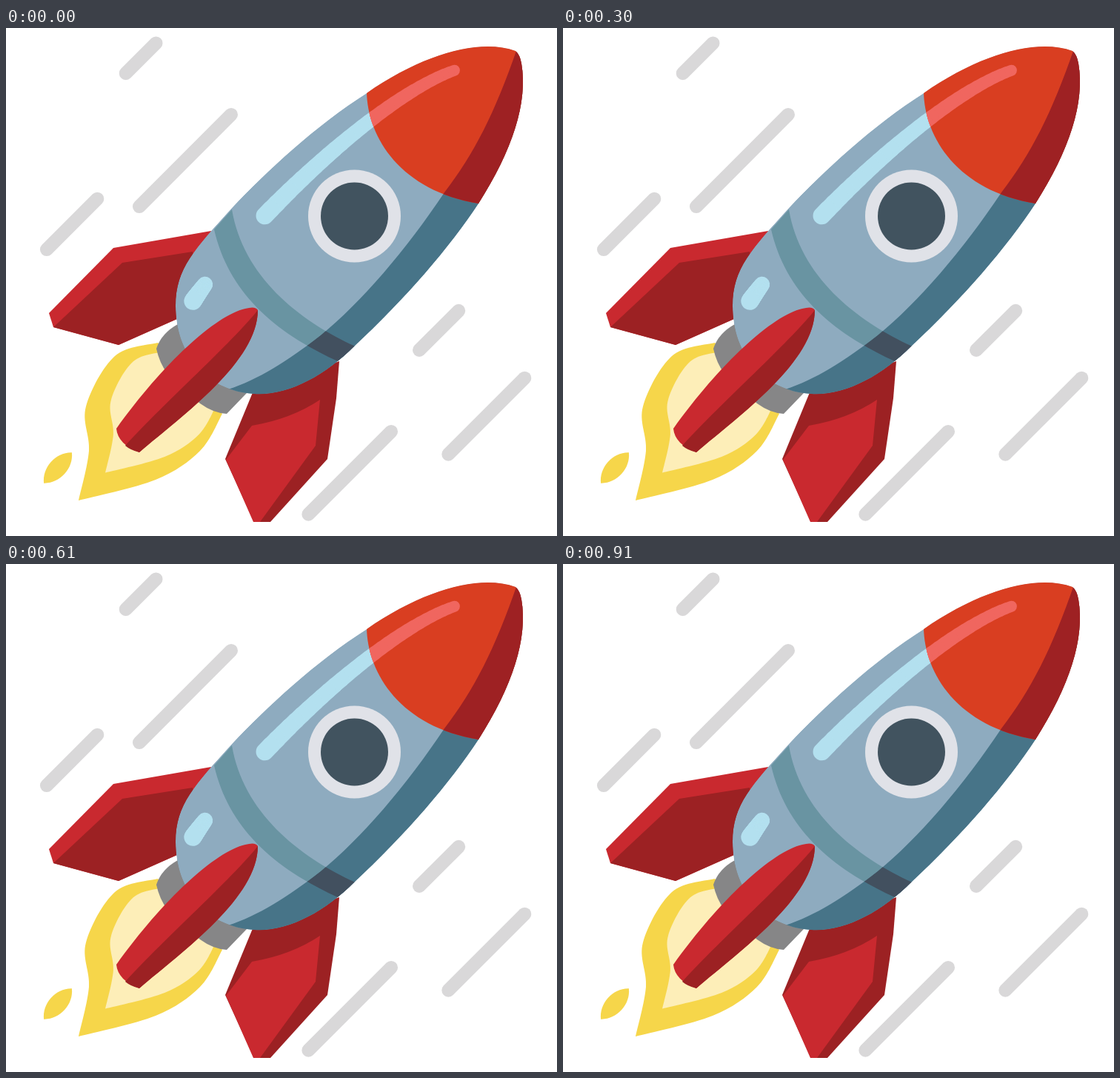
Recreate the animation shown at these times as an HTML page with a canvas. Size 744 by 686 pixels, loop 940 ms.

```html
<!DOCTYPE html>
<html lang="en">
<head>
<meta charset="utf-8">
<title>Rocket</title>
<style>
  html, body { margin: 0; overflow: hidden; background: #fff; }
  canvas { display: block; }
</style>
</head>
<body>
<canvas id="stage" width="744" height="686"></canvas>
<script>
const ctx = document.getElementById('stage').getContext('2d');
const LOOP = 940;
const CYCLE_STARTS = [0, 300, 610, 910];

const shape = d => new Path2D(d);
const body = shape('M688 31C640 14 565 34 487 88C420 130 350 195 305 243C255 298 229 325 229 375C229 440 270 490 335 494C380 497 430 470 470 430C540 365 600 295 638 237C684 165 705 100 696 48Q694 36 688 31Z');
const shade = shape('M690 28C660 115 632 170 592 222C540 300 480 370 425 415C380 450 340 475 300 488L340 520L744 300V0Z');
const nose = shape('M487 86C488 148 533 220 638 237L744 237V0H487Z');
const band = shape('M305 245C320 335 395 395 472 430L448 450C360 410 300 355 281 272Z');
const nozzle = shape('M232 400Q210 412 203 433Q207 452 218 467L262 507Q280 520 298 521L325 493L260 400Z');
const leftFin = shape('M58 385L145 297L277 274L260 380L152 428L64 404Z');
const leftFace = shape('M64 404L157 317L252 302L260 380L152 428Z');
const rightFin = shape('M334 490L450 450L446 500L434 582L357 667L335 667L296 582Z');
const rightFace = shape('M297 583L332 537Q385 528 424 502L418 564L343 667L334 667Z');
const midFin = shape('M340 381Q337 375 323 379C283 388 212 453 149 541Q151 562 180 573C240 522 340 450 340 381Z');
const midFace = shape('M340 381C305 425 215 505 161 564Q168 570 180 573C240 522 340 450 340 381Z');

const streaks = [
  { diagonal: 223, from: 220, to: 138, start: -.3, life: .65 },
  { diagonal: 421, from: 341, to: 76, start: -.263, life: .704 },
  { diagonal: 354, from: 292, to: 48, start: .285, life: .86 },
  { diagonal: 993, from: 634, to: 527, start: -.3, life: .65 },
  { diagonal: 1173, from: 736, to: 523, start: -.305, life: .745 },
  { diagonal: 1065, from: 690, to: 390, start: .285, life: .95 }
];

const mix = (a, b, t) => a + (b - a) * t;
const easeOut = (t, power) => 1 - (1 - t) ** power;

function fill(path, color) {
  ctx.fillStyle = color;
  ctx.fill(path);
}

function within(path, draw) {
  ctx.save();
  ctx.clip(path);
  draw();
  ctx.restore();
}

function disc(x, y, r, color) {
  ctx.fillStyle = color;
  ctx.beginPath();
  ctx.arc(x, y, r, 0, Math.PI * 2);
  ctx.fill();
}

function line(x1, y1, x2, y2, width, color) {
  ctx.lineCap = 'round';
  ctx.lineWidth = width;
  ctx.strokeStyle = color;
  ctx.beginPath();
  ctx.moveTo(x1, y1);
  ctx.lineTo(x2, y2);
  ctx.stroke();
}

// The head brakes while the tail catches up
function drawStreaks(phase) {
  for (const { diagonal, from, to, start, life } of streaks) {
    for (const lap of [-1, 0, 1]) {
      const u = (phase + lap - start) / life;
      if (u <= 0 || u >= 1) continue;
      const head = mix(from, to, easeOut(u, 2));
      const tail = mix(from, to, u * u);
      line(head, diagonal - head, tail, diagonal - tail, 18, '#d9d8d9');
    }
  }
}

// Continues the current path smoothly through the points
function curveThrough(points) {
  const at = i => points[Math.max(0, Math.min(points.length - 1, i))];
  ctx.lineTo(...points[0]);
  for (let i = 0; i < points.length - 1; i++) {
    const [a, b, c, d] = [at(i - 1), at(i), at(i + 1), at(i + 2)];
    ctx.bezierCurveTo(
      b[0] + (c[0] - a[0]) / 6, b[1] + (c[1] - a[1]) / 6,
      c[0] - (d[0] - b[0]) / 6, c[1] - (d[1] - b[1]) / 6, ...c);
  }
}

// The tip splits twice per cycle, the flame narrows once
function drawFlame(phase) {
  const beat = phase < .6 ? phase / .6 : (phase - .6) / .4;
  const split = Math.sin(Math.PI * beat);
  const narrow = Math.sin(Math.PI * phase ** 1.36) ** 6;
  const tipX = 98 - 16 * narrow;
  const tipY = 638 - 28 * narrow;
  const left = [
    [205, 425 + 19 * narrow],
    [147 + 9 * narrow, 443 + 24 * narrow],
    [108 + 16 * narrow + 9 * split, 511 - 6 * narrow + 9 * split],
    [112 + 5 * narrow - 10 * split, 571 - 23 * narrow + 6 * split],
    [tipX + 4 * split, tipY - 36 * split]
  ];
  const right = [
    [tipX + 79 * split, tipY - 7 * split],
    [202 + 8 * split, 610 - 35 * narrow + 12 * split],
    [262 - 17 * narrow + 12 * split, 571],
    [292 - 12 * narrow, 521]
  ];
  for (const [size, color] of [[1, '#f6d64a'], [.77, '#fdeeb8']]) {
    const scaled = ([x, y]) => [mix(255, x, size), mix(475, y, size)];
    ctx.beginPath();
    curveThrough(left.map(scaled));
    curveThrough(right.map(scaled));
    ctx.fillStyle = color;
    ctx.fill();
  }
}

function drawDrop(x, y, angle, length, width, age) {
  const size = Math.min(1, 1 - age / .2);
  if (age < -.15 || size <= 0) return;
  ctx.save();
  ctx.translate(x - 70 * age, y + 60 * age);
  ctx.rotate(angle);
  ctx.scale(size * length / 2, size * width / 2);
  ctx.beginPath();
  ctx.moveTo(-1, 0);
  ctx.bezierCurveTo(-.5, -1.3, .5, -1.3, 1, 0);
  ctx.bezierCurveTo(.5, 1.3, -.5, 1.3, -1, 0);
  ctx.fillStyle = '#f6d64a';
  ctx.fill();
  ctx.restore();
}

function glintPoint(t) {
  const s = 1 - t;
  const bezier = (a, b, c, d) => a * s ** 3 + 3 * b * s * s * t + 3 * c * s * t * t + d * t ** 3;
  return [bezier(612, 500, 305, 245), bezier(55, 90, 285, 380)];
}

// Each glint slides down the hull for two cycles
function drawGlints(phase, color) {
  for (const lap of [0, 1, 2]) {
    const u = (phase + lap - .38) / 2.02;
    if (u < 0 || u > 1) continue;
    const head = .97 * easeOut(u, 3);
    const tail = .97 * easeOut(Math.max(0, (u - .3) / .7), 2);
    const length = head - tail;
    const taper = 9 * Math.min(1, length / .2);
    const width = Math.min(24, 14 + length * 200);
    const steps = 30;
    for (let i = 0; i < steps; i++) {
      const a = glintPoint(mix(tail, head, i / steps));
      const b = glintPoint(mix(tail, head, (i + 1) / steps));
      line(...a, ...b, width - taper * (1 - i / steps), color);
    }
  }
}

function drawFin(fin, face, finColor, faceColor, x, y) {
  ctx.save();
  ctx.translate(x, y);
  fill(fin, finColor);
  fill(face, faceColor);
  ctx.restore();
}

function drawBody(phase, sway) {
  within(body, () => {
    fill(body, '#8eabbf');
    fill(band, '#6994a2');
    fill(shade, '#477488');
    within(shade, () => fill(band, '#42505f'));
    drawGlints(phase, '#b3e0ef');
    fill(nose, '#d93e21');
    within(nose, () => {
      drawGlints(phase, '#f0665f');
      fill(shade, '#9e2123');
    });
  });
  const x = 470.5 + sway * 3.3;
  const y = 254 + sway * 3.3;
  disc(x, y, 62.5, '#e0e2e8');
  disc(x, y, 45.5, '#41535f');
}

// Swings most at its lower end
function drawMidFin(sway) {
  ctx.save();
  ctx.transform(1 - .016 * sway, 0, 0, 1 + .02 * sway, 7.94 * sway, -5.64 * sway);
  drawFin(midFin, midFace, '#c9292f', '#9c2123', 0, 0);
  ctx.restore();
}

// Ten held poses per cycle, three cycles per loop
function progress(ms) {
  const i = CYCLE_STARTS.findLastIndex(start => ms >= start);
  if (i === 3) return 3;
  const part = (ms - CYCLE_STARTS[i]) / (CYCLE_STARTS[i + 1] - CYCLE_STARTS[i]);
  return i + Math.floor(part * 10 + .2) / 10;
}

function render(ms) {
  const total = progress(ms);
  const phase = total - Math.floor(total);
  const sway = -Math.sin(Math.PI * total);
  const spread = Math.abs(sway);
  ctx.fillStyle = '#fff';
  ctx.fillRect(0, 0, 744, 686);
  drawStreaks(phase);
  drawFin(leftFin, leftFace, '#c9292f', '#9c2123', 2 * spread, 1.5 * sway);
  drawFin(rightFin, rightFace, '#9c2123', '#c9292f', -1.5 * spread, -spread);
  drawFlame(phase);
  drawDrop(140, 618, -.45, 74, 23, phase - .6);
  drawDrop(70, 594, -.83, 56, 25, phase > .6 ? phase - 1 : phase);
  fill(nozzle, '#868687');
  drawBody(phase, sway);
  drawMidFin(sway);
}

const began = performance.now();
function tick() {
  render((performance.now() - began) % LOOP);
  requestAnimationFrame(tick);
}
tick();
</script>
</body>
</html>
```
